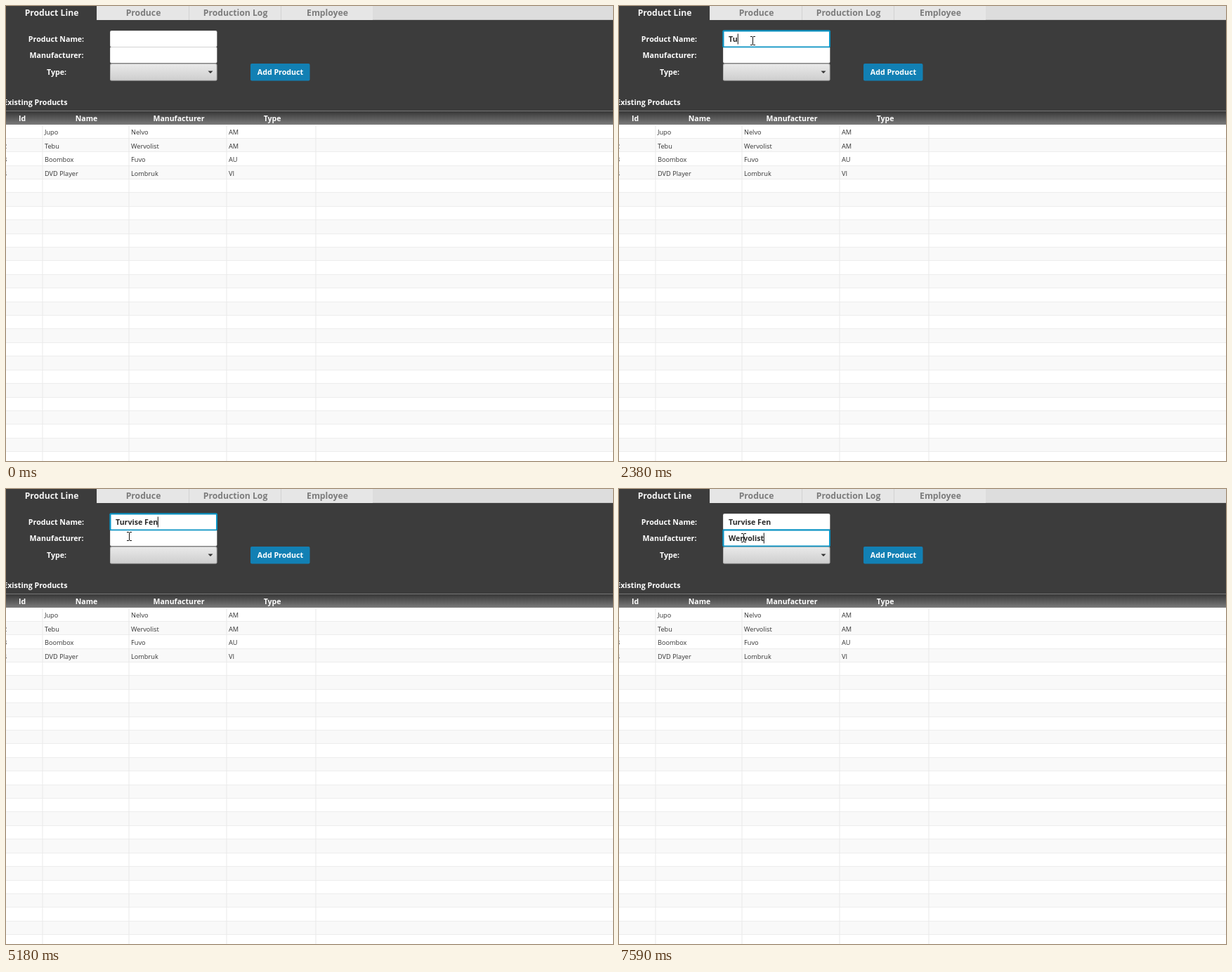
Write an HTML page with a canvas that moves like this. It is 864 by 648 pixels and loops after 8 s.

```html
<!DOCTYPE html>
<html lang="en">
<head>
<meta charset="utf-8">
<title>Product form</title>
<style>
  html, body { margin: 0; width: 100%; height: 100%; overflow: hidden; background: #3c3c3c; }
  canvas { display: block; width: 864px; height: 648px; }
</style>
</head>
<body>
<canvas id="stage" width="864" height="648"></canvas>
<script>
const ctx = document.getElementById('stage').getContext('2d');
const W = 864, H = 648, LOOP = 8000, BLINK = 500;
const FAMILY = '"Open Sans", "Noto Sans", sans-serif';
const BOLD = `bold 10.65px ${FAMILY}`;
const HEAD = `bold 10.5px ${FAMILY}`;
const TAB = `bold 12.2px ${FAMILY}`;
const CELL = `9.2px ${FAMILY}`;

const ROW_TOP = 169.3, ROW_H = 19.41;
const columns = [52, 175, 314, 441];
const products = [
  ['Jupo', 'Nelvo', 'AM'],
  ['Tebu', 'Wervolist', 'AM'],
  ['Boombox', 'Fuvo', 'AU'],
  ['DVD Player', 'Lombruk', 'VI']
];

const fields = [
  { y: 35, text: 'Turvise Fen', focus: 820, caret: 1050, blur: 5260,
    keys: [1370, 2380, 2530, 2720, 2910, 3110, 3310, 3540, 3860, 4000, 4160] },
  { y: 58, text: 'Wervolist', focus: 5260, caret: 5400, blur: LOOP,
    keys: [6270, 6420, 6590, 6760, 6940, 7120, 7290, 7360, 7590] }
];

// Pointer moves: sampled every `step` ms along [time, x, y] points
const moves = [
  { from: 210, step: 83, path: [[210, 698, 580], [380, 560, 430], [540, 335, 195],
    [680, 215, 75], [790, 187, 48], [980, 187, 48], [1040, 190, 49]] },
  { from: 4630, step: 85, path: [[4630, 186, 46], [4715, 158, 35], [4800, 134, 28],
    [4885, 137, 34], [4970, 155, 53], [5130, 175, 67], [5380, 177, 69]] }
];
const clicks = [[820, 1040], [5260, 5400]];

function rect(x, y, w, h, color) {
  ctx.fillStyle = color;
  ctx.fillRect(x, y, w, h);
}

function round(x, y, w, h, r, color) {
  ctx.fillStyle = color;
  ctx.beginPath();
  ctx.roundRect(x, y, w, h, r);
  ctx.fill();
}

function label(text, x, y, font, color, align = 'center') {
  ctx.font = font;
  ctx.fillStyle = color;
  ctx.textAlign = align;
  ctx.fillText(text, x, y);
}

function shade(y0, y1, ...colors) {
  const g = ctx.createLinearGradient(0, y0, 0, y1);
  colors.forEach((c, i) => g.addColorStop(i / (colors.length - 1), c));
  return g;
}

function drawTabs() {
  rect(0, 0, W, H, '#3c3c3c');
  rect(129, 0, W - 129, 20, '#dddddd');
  rect(522, 19, W - 522, 1, '#c8c8c8');
  rect(130, 0, 392, 20, '#e6e6e6');
  for (const x of [260, 391]) rect(x, 0, 1, 20, '#d2d2d2');
  label('Product Line', 65, 14, TAB, '#f4f4f4');
  label('Produce', 195.5, 14, TAB, '#7c7c7c');
  label('Production Log', 326.5, 14, TAB, '#7c7c7c');
  label('Employee', 457.5, 14, TAB, '#7c7c7c');
}

function drawForm() {
  label('Product Name:', 71.5, 51, BOLD, '#fff');
  label('Manufacturer:', 72, 74, BOLD, '#fff');
  label('Type:', 72, 98, BOLD, '#fff');
  label('Existing Products', 87.5, 141, BOLD, '#fff', 'right');

  round(148, 82, 152.5, 24.5, 2, '#b5b5b5');
  round(149, 83, 150.5, 22.5, 2, shade(83, 106, '#e9e9e9', '#cecece'));
  ctx.fillStyle = '#333';
  ctx.beginPath();
  ctx.moveTo(287.5, 92.5);
  ctx.lineTo(294.5, 92.5);
  ctx.lineTo(291, 96);
  ctx.fill();

  round(348, 82, 84.5, 24.5, 2, '#1280b4');
  label('Add Product', 390.5, 98, BOLD, '#fff');
}

function drawTable() {
  rect(0, 149, W, 21, '#777777');
  rect(0, 150, W, 20, shade(150, 169, '#373737', '#7b7b7b'));
  [['Id', 23], ['Name', 114.5], ['Manufacturer', 246], ['Type', 379]]
    .forEach(([t, x]) => label(t, x, 164, HEAD, '#fff'));

  for (let i = 0; i < 25; i++) {
    const y = Math.round(ROW_TOP + i * ROW_H);
    const end = Math.round(ROW_TOP + (i + 1) * ROW_H);
    rect(0, y, W, end - y, i % 2 ? '#f9f9f9' : '#ffffff');
    rect(0, end - 1, W, 1, '#ededed');
  }
  for (const x of columns) rect(x - 0.5, 170, 1, H - 170, '#e9e9e9');
  products.forEach((cells, i) => {
    const y = Math.round(ROW_TOP + i * ROW_H) + 14;
    label(i + 1, -4, y, CELL, '#333', 'left');
    cells.forEach((c, j) => label(c, columns[j] + 3, y, CELL, '#333', 'left'));
  });
}

function drawField(f, t) {
  const focused = t >= f.focus && t < f.blur;
  if (focused) {
    round(147.3, f.y - 0.7, 153.7, 25, 2, '#0a93c4');
    rect(149.5, f.y + 1.5, 149.5, 21, '#fff');
  } else {
    round(148, f.y, 152.5, 23.5, 2, '#c4c4c4');
    round(148.5, f.y + 0.5, 151.5, 22.5, 2, '#fff');
  }
  const typed = f.keys.filter(k => k <= t);
  const text = f.text.slice(0, typed.length);
  label(text, 156, f.y + 16, BOLD, '#2b2b2b', 'left');
  const last = typed.length ? typed[typed.length - 1] : f.caret;
  const on = Math.floor((t - last) / BLINK) % 2 === 0;
  if (focused && t >= f.caret && on) {
    rect(156 + Math.round(ctx.measureText(text).width) - 0.2, f.y + 4.5, 1, 15, '#111');
  }
}

function pointerAt(t) {
  const move = moves.filter(m => m.from <= t).pop();
  if (!move) return null;
  const { from, step, path } = move;
  const s = from + Math.floor((t - from) / step) * step;
  const i = path.findIndex(p => p[0] > s);
  if (i < 0) return path[path.length - 1].slice(1);
  const a = path[i - 1], b = path[i];
  const k = (s - a[0]) / (b[0] - a[0]);
  return [a[1] + (b[1] - a[1]) * k, a[2] + (b[2] - a[2]) * k].map(Math.round);
}

function drawArrow(x, y) {
  ctx.beginPath();
  [[0, 0], [0, 16], [4, 12.5], [6.5, 18], [9, 17], [6.5, 11.5], [11, 11.5]]
    .forEach(([dx, dy]) => ctx.lineTo(x + dx + 0.5, y + dy + 0.5));
  ctx.closePath();
  ctx.fillStyle = '#fff';
  ctx.fill();
  ctx.strokeStyle = '#000';
  ctx.lineWidth = 1;
  ctx.stroke();
}

function drawBeam(x, y) {
  rect(x, y - 5, 1, 11, '#111');
  for (const dy of [-6, 6]) {
    rect(x - 3, y + dy, 3, 1, '#111');
    rect(x + 1, y + dy, 3, 1, '#111');
  }
}

function drawPointer(t) {
  const p = pointerAt(t);
  if (!p) return;
  const [x, y] = p;
  const inField = x >= 148 && x <= 300 && y >= 35 && y <= 82;
  (inField ? drawBeam : drawArrow)(x, y);
}

function drawClick(t) {
  if (!clicks.some(([a, b]) => t >= a && t < b)) return;
  const [x, y] = pointerAt(t);
  ctx.fillStyle = '#fdfb62';
  ctx.beginPath();
  ctx.arc(x - 2, y - 0.5, 9.3, 0, Math.PI * 2);
  ctx.fill();
}

function frame(now) {
  const t = now % LOOP;
  drawTabs();
  drawForm();
  drawTable();
  // The focused field overlaps its neighbour
  const order = t < fields[0].blur ? [1, 0] : [0, 1];
  order.forEach(i => drawField(fields[i], t));
  drawClick(t);
  drawPointer(t);
  requestAnimationFrame(frame);
}
requestAnimationFrame(frame);
</script>
</body>
</html>
```
